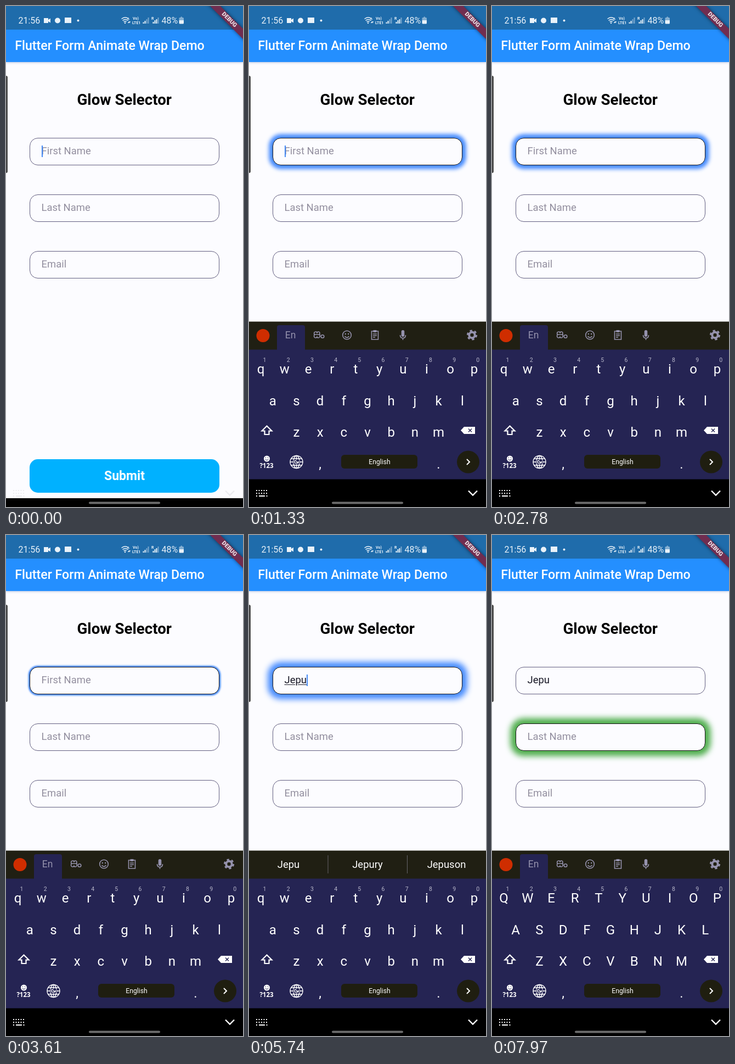
Animation, 432 px wide and 912 px high, one loop 7.99 s. Source, as an HTML page:

```html
<!DOCTYPE html>
<html lang="en">
<head>
<meta charset="utf-8">
<title>Glow Selector</title>
<style>
  html, body { margin: 0; width: 100%; height: 100%; overflow: hidden; background: #fcfcff; }
  #stage { position: relative; width: 432px; height: 912px; overflow: hidden; background: #fcfcff;
    font-family: Roboto, "Noto Sans", sans-serif; }
  #stage > * { position: absolute; }
  svg { left: 0; top: 0; display: block; }
  svg text { white-space: pre; }
  .mid { text-anchor: middle; }
  .line { fill: none; stroke: currentColor; }

  .status { width: 432px; height: 43px; background: #1f6cab; }
  .appbar { top: 43px; width: 432px; height: 58.5px; background: #248fff; box-shadow: 0 1px 4px rgba(40, 70, 150, .3); }
  .handle { left: -3px; top: 127px; width: 6px; height: 177px; border-radius: 3px; background: #4b4b4b; }
  .submit { left: 43px; top: 825px; width: 345.5px; height: 61px; border-radius: 15px; background: #00b1ff; }
  .nav { top: 896px; width: 432px; height: 16px; background: #000; }
  .debug { left: 332px; top: 0; width: 200px; height: 12.5px; background: #702d50;
    box-shadow: 0 0 6px rgba(0, 0, 0, .55); transform-origin: 100px 0;
    transform: rotate(45deg) translateY(29.4px);
    color: rgba(255, 255, 255, .85); font: 900 10.7px/12.5px Roboto, sans-serif; text-align: center; }

  .field { left: 43px; width: 345.5px; height: 50px; box-sizing: border-box; border: 1px solid #625e80;
    border-radius: 15px; background: #fcfcff; font-size: 18.45px; line-height: 48px; white-space: pre; }
  .field > * { position: absolute; left: 20.5px; top: -1px; }
  .hint { color: #938f9f; }
  .typed { color: #181826; text-underline-offset: 2px; text-decoration-thickness: 1px; }
  .caret { display: inline-block; width: 2px; height: 21px; margin: 0 -2px 0 0; background: #4489f5; vertical-align: -5px; }
  #first { top: 240px; animation: blueGlow 7990ms linear infinite; }
  #last { top: 343px; animation: greenGlow 7990ms linear infinite; }
  #email { top: 446px; }

  @keyframes blueGlow {
    0%, .68% { border-color: #625e80; box-shadow: 0 0 0 0 #448aff; }
    .69% { border-color: #111; box-shadow: 0 0 0 0 #448aff; }
    25.72% { border-color: #111; box-shadow: 0 0 12px 10.5px #448aff; }
    50.75% { border-color: #111; box-shadow: 0 0 0 0 #448aff; }
    75.78% { border-color: #111; box-shadow: 0 0 12px 10.5px #448aff; }
    76.96% { border-color: #111; box-shadow: 0 0 11.4px 10px #448aff; }
    76.97%, 100% { border-color: #625e80; box-shadow: 0 0 0 0 #448aff; }
  }
  @keyframes greenGlow {
    0%, 76.96% { border-color: #625e80; box-shadow: 0 0 0 0 #50ae4e; }
    76.97% { border-color: #111; box-shadow: 0 0 0 0 #50ae4e; }
    100% { border-color: #111; box-shadow: 0 0 11px 9.7px #50ae4e; }
  }
  #keyboard { animation: rise 7990ms infinite; }
  @keyframes rise {
    0%, .25% { transform: translateY(338px); animation-timing-function: cubic-bezier(.2, .6, .3, 1); }
    4.4%, 100% { transform: none; }
  }
  #navIcons { animation: whiten 7990ms linear infinite; }
  @keyframes whiten { 0%, .25% { color: #ececf0; } 3%, 100% { color: #fff; } }
</style>
</head>
<body>
<div id="stage">
  <div class="appbar"></div>
  <div class="status"></div>
  <div class="handle"></div>
  <div class="field" id="first"><span class="hint">First Name</span><span><span class="typed"></span><i class="caret"></i></span></div>
  <div class="field" id="last"><span class="hint">Last Name</span><span><i class="caret"></i></span></div>
  <div class="field" id="email"><span class="hint">Email</span></div>
  <div class="submit"></div>
  <div class="nav"></div>

  <svg width="432" height="912" color="#e9f2f9">
    <g fill="#e9f2f9">
      <text x="22.5" y="32" font-size="16">21:56</text>
      <text x="283.5" y="32" font-size="16">48%</text>
      <path d="M69 22h8v3l4-2.5v8l-4-2.5v3h-8z"/>
      <circle cx="94" cy="26.5" r="5"/>
      <rect x="107" y="21" width="12" height="10"/>
      <circle cx="131.5" cy="26.5" r="2"/>
      <path class="line" stroke-width="1.5" d="M210.5 23.5q7-5.5 13 0M212.5 26.5q5-4 9.500 0M214.5 29q3-2 5 0"/>
      <circle cx="217" cy="31" r="1.2"/>
      <text x="221" y="25.5" font-size="7">6</text>
      <path d="M222 31l1.5-3 1.5 3zM224 28h3l-1.5 3z"/>
      <g font-size="7" font-weight="700"><text x="231" y="25">Vo)</text><text x="230" y="32.5">LTE1</text><text x="265" y="24.5">R</text></g>
      <path d="M249.5 32v-2.5h2V32zM252.5 32v-5h2v5z"/>
      <path opacity=".45" d="M255.5 32v-8h2v8zM258.5 32V21h2v11z"/>
      <path d="M267.5 32v-3h2v3zM270.5 32v-6h2v6zM273.5 32v-8h2v8z"/>
      <path opacity=".45" d="M276.5 32V21h2v11z"/>
      <path opacity=".5" d="M317 21h1.5v-1.5h2.5V21h1.5q1.5 0 1.5 1.5V26h-8.5v-3.5q0-1.5 1.5-1.5z"/>
      <path d="M315.5 26h8.5v5q0 1.5-1.5 1.5H317q-1.5 0-1.5-1.5z"/>
    </g>
    <text x="16.3" y="79.5" font-size="23.17" font-weight="500" fill="#fff">Flutter Form Animate Wrap Demo</text>
    <text class="mid" x="215.7" y="179.5" font-size="27.68" font-weight="600">Glow Selector</text>
    <text class="mid" x="216" y="863.3" font-size="23.07" font-weight="700" fill="#fff">Submit</text>
  </svg>
  <div class="debug">DEBUG</div>

  <svg id="keyboard" width="432" height="912" fill="#fff" color="#fff">
    <path fill="#201f13" d="M0 574.5h432V626H0z"/>
    <path fill="#252453" d="M0 625.5h432V862H0z"/>
    <path d="M0 861.5h432V912H0z" fill="#000"/>
    <g id="tools" color="#9592ad" fill="#9592ad">
      <circle cx="25.5" cy="600" r="12" fill="#cf2d00"/>
      <path fill="#252453" d="M51 626v-41q0-4 4-4h43q4 0 4 4v41z"/>
      <text class="mid" x="75.5" y="605" font-size="17.5">En</text>
      <g class="line" stroke-width="1.6">
        <path d="M119 598q-1.5-5 3-5 2 0 2 2.5 0-2.5 2.5-2.5 3.5 0 2 5M119 598h10q1 6-3 6-2 0-2-2.5 0 2.5-2.5 2.5-4 0-2.5-6"/>
        <circle cx="134" cy="601.5" r="2.8"/>
        <circle cx="178.5" cy="599" r="7.8"/><path d="M174.5 601q4 5 8 0"/>
        <path d="M223.5 592h12v15h-12z"/>
        <path d="M226 597h7M226 600h7M226 603h4" stroke-width="1.3"/>
        <path d="M275.5 599q0 5.5 5 5.5t5-5.5M280.5 604.5v3.5"/>
        <circle cx="406.5" cy="599" r="5.2" stroke-width="4"/>
        <circle cx="406.5" cy="599" r="8" stroke-width="3.2" stroke-dasharray="4.2 4.178"/>
      </g>
      <circle cx="175.8" cy="597" r="1.2"/><circle cx="181.2" cy="597" r="1.2"/>
      <path d="M226.5 590h6v4h-6z"/>
      <rect x="277.7" y="590" width="5.6" height="12" rx="2.8"/>
    </g>
    <g id="suggestions" font-size="18.45" class="mid">
      <path class="line" style="stroke:#66656a" d="M144 583v33M288.5 583v33"/>
      <text x="72" y="605.5"></text><text x="216" y="605.5"></text><text x="360" y="605.5"></text>
    </g>
    <g id="digits" class="mid" font-size="10.5" fill="#b9b8cb"></g>
    <g id="keys" class="mid" font-size="24"></g>
    <path class="line" stroke-width="2.2" d="M32.5 764.5l-9 9h5v6.5h8v-6.5h5z"/>
    <path d="M386 772.5l6-6.5h20v13h-20z"/>
    <path class="line" style="stroke:#252453" stroke-width="1.4" d="M400 769.5l6 6M406 769.5l-6 6"/>
    <circle cx="32.5" cy="824" r="5.5"/>
    <path class="line" style="stroke:#252453" d="M29.5 825q3 3.5 6 0M30.5 821.5v1.5M34.5 821.5v1.5"/>
    <text class="mid" x="32" y="841" font-size="11.5" font-weight="600" font-family="Noto Sans, sans-serif">?123</text>
    <g class="line" stroke-width="1.4">
      <circle cx="86.5" cy="830" r="11.5"/><ellipse cx="86.5" cy="830" rx="5.5" ry="11.5"/>
      <path d="M75 830h23M77 824h19M77 836h19M86.5 818.5v23"/>
    </g>
    <rect x="81" y="826" width="11" height="8" rx="3" fill="#252453"/>
    <path class="line" stroke-width="1.3" d="M82.5 829q2-3 4 0t4 0M82.5 829q0 4 4 3 4 1 4-3"/>
    <text class="mid" x="129.5" y="842" font-size="24">,</text>
    <text class="mid" x="345.5" y="842" font-size="24">.</text>
    <rect x="168" y="817" width="139" height="25" rx="6" fill="#1f1e10"/>
    <text class="mid" x="238" y="834" font-size="12.2">English</text>
    <circle cx="399.5" cy="830" r="20.5" fill="#1f1e10"/>
    <path class="line" stroke-width="2" d="M397 825l5 5-5 5"/>
  </svg>

  <svg id="navIcons" width="432" height="912">
    <rect x="151" y="902.5" width="130" height="4" rx="2" fill="#6c6c6c"/>
    <g class="line" stroke-width="2">
      <path stroke-dasharray="2 2.5" d="M13 882h21M13 887h21"/>
      <path d="M13 892h2M18 892h11M31.500 892h2"/>
      <path d="M400 882.5l8 8 8-8" stroke-width="2.4"/>
    </g>
  </svg>
</div>
<script>
  const LOOP = 7990, FOCUS_LAST = 6150;
  const typing = [
    { at: 0, text: "" },
    { at: 4150, text: "J", words: ["Join", "Job", "Jobs"] },
    { at: 4600, text: "Je", words: ["Jet", "Jewel", "Jelly"] },
    { at: 4950, text: "Jep", words: ["Jepu", "Jeep", "Jepuson"].map(w => w === "Jeep" ? "Jepury" : w) },
    { at: 5300, text: "Jepu", words: ["Jepu", "Jepury", "Jepuson"] },
    { at: FOCUS_LAST, text: "Jepu" }
  ];
  typing[3].words = typing[4].words;
  const $ = selector => document.querySelector(selector);

  function addText(parent, x, y, value) {
    const node = document.createElementNS("http://www.w3.org/2000/svg", "text");
    node.setAttribute("x", x);
    node.setAttribute("y", y);
    node.textContent = value;
    parent.append(node);
    return node;
  }

  const keys = [];
  ["qwertyuiop", "asdfghjkl", "zxcvbnm"].forEach((row, r) =>
    [...row].forEach((letter, i) =>
      keys.push({ letter, node: addText($("#keys"), [21.6, 43.2, 86.4][r] + 43.2 * i, [669, 727, 784][r], letter) })));
  [..."1234567890"].forEach((digit, i) => addText($("#digits"), 28.5 + 43.2 * i, 648, digit));

  const typed = $(".typed"), hint = $("#first .hint");
  const carets = [$("#first .caret"), $("#last .caret")];
  const words = document.querySelectorAll("#suggestions text");
  const show = (node, on) => { node.style.visibility = on ? "visible" : "hidden"; };

  function render(t) {
    const step = typing.findLast(s => s.at <= t);
    const onLast = t >= FOCUS_LAST;
    typed.textContent = step.text;
    typed.style.textDecoration = onLast ? "none" : "underline";
    show(hint, !step.text);

    const lit = Math.floor((t - step.at) / 500) % 2 === 0;
    show(carets[0], lit && !onLast);
    show(carets[1], lit && onLast);

    show($("#tools"), !step.words);
    show($("#suggestions"), step.words);
    words.forEach((node, i) => { node.textContent = step.words ? step.words[i] : ""; });

    const upper = (t >= 3700 && t < 4150) || t >= 7600;
    keys.forEach(k => { k.node.textContent = upper ? k.letter.toUpperCase() : k.letter; });
  }

  let start;
  function tick(now) {
    start ??= now;
    render((now - start) % LOOP);
    requestAnimationFrame(tick);
  }
  render(0);
  requestAnimationFrame(tick);
</script>
</body>
</html>
```
